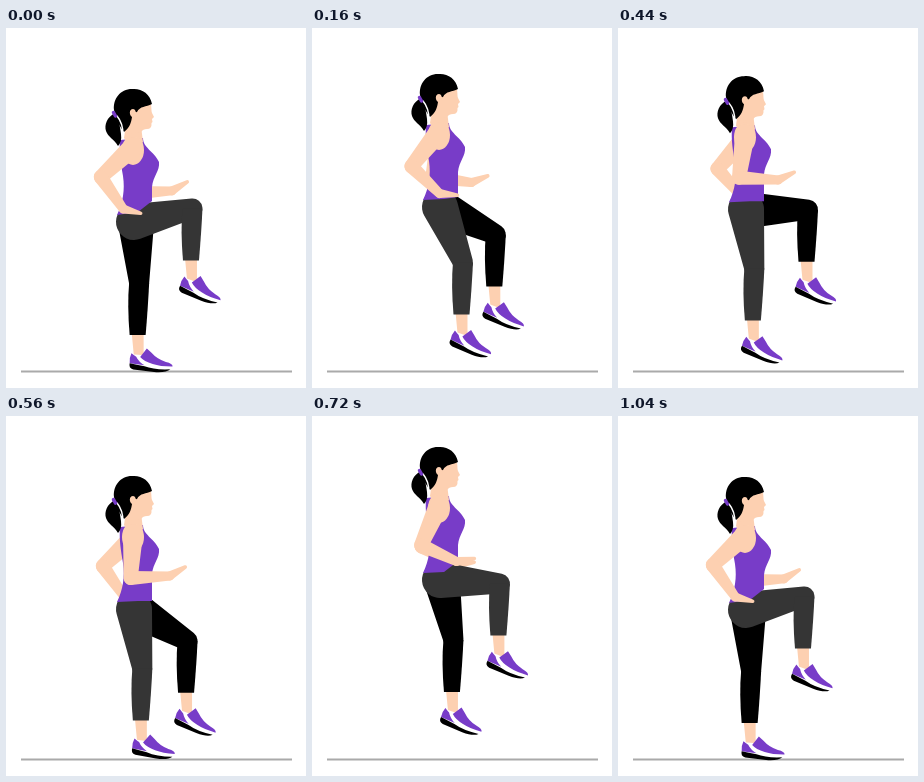
These frames come from a looping animation (300 by 360 pixels, 1080 ms). An HTML page with a canvas:

```html
<!DOCTYPE html>
<html>
<head>
<meta charset="utf-8">
<style>
  html, body { margin: 0; width: 100%; height: 100%; overflow: hidden; background: #fff; }
  canvas { display: block; width: 300px; height: 360px; }
</style>
</head>
<body>
<canvas id="stage" width="300" height="360"></canvas>
<script>
const ctx = document.getElementById('stage').getContext('2d');
const LOOP = 1080, STEP = 40;
const HOP = 30, THIGH = 60, SHIN = 52, UPPER_ARM = 44, FOREARM = 39;
const SKIN = '#fdd0b1', PURPLE = '#783cc8', GRAY = '#353535', BLACK = '#000';

const rad = deg => deg * Math.PI / 180;
const clamp = (v, lo, hi) => Math.min(hi, Math.max(lo, v));

// Smooth 0 to 1 between two times.
const ramp = (t, from, to) => (1 - Math.cos(Math.PI * clamp((t - from) / (to - from), 0, 1))) / 2;

function fill(color, d) {
  ctx.fillStyle = color;
  ctx.fill(new Path2D(d));
}

function line(color, width, d) {
  ctx.strokeStyle = color;
  ctx.lineWidth = width;
  ctx.lineCap = 'round';
  ctx.stroke(new Path2D(d));
}

// Tapered limb: two circles joined by their outer tangents.
function limb(color, x1, y1, r1, x2, y2, r2) {
  const dir = Math.atan2(y2 - y1, x2 - x1);
  const open = Math.acos((r1 - r2) / Math.hypot(x2 - x1, y2 - y1));
  ctx.fillStyle = color;
  ctx.beginPath();
  ctx.arc(x1, y1, r1, dir + open, dir - open + 2 * Math.PI);
  ctx.arc(x2, y2, r2, dir - open, dir + open);
  ctx.closePath();
  ctx.fill();
}

// swing: 0 = elbow back with hand at the hip, 1 = forearm forward.
function arm(x, y, swing) {
  const upper = rad(47 - 44 * swing), fore = rad(55 - 58 * swing), hand = rad(14 - 44 * swing);
  const ex = x - UPPER_ARM * Math.sin(upper), ey = y + UPPER_ARM * Math.cos(upper);
  const wx = ex + FOREARM * Math.cos(fore), wy = ey + FOREARM * Math.sin(fore);
  limb(SKIN, x, y, 10, ex, ey, 7);
  limb(SKIN, ex, ey, 7, wx, wy, 4.5);
  limb(SKIN, wx, wy, 4.5, wx + 18 * Math.cos(hand), wy + 18 * Math.sin(hand), 1.8);
}

function shoe(x, y) {
  ctx.save();
  ctx.translate(x, y);
  ctx.rotate(rad(clamp((326 - y) * 1.4, 2, 20)));
  fill('#fff', 'M-8 4L-9 15L32 16Q35 14 33 11L2 4Z');
  fill(PURPLE, 'M1 6L7 -3L12 1Q18 7 27 9Q34 10 34 13Q22 14 14 12Q5 10 1 6Z');
  fill(PURPLE, 'M-8 3Q-5 5 -3 6Q0 11 6 14L-9 13Q-10 8 -8 3Z');
  fill(BLACK, 'M-9 13Q-2 14 6 15Q16 18 32 16Q28 20 16 20L-5 19Q-10 18 -9 13Z');
  ctx.restore();
}

// The shin hangs straight down; only the thigh turns.
function leg(color, x, y, angle) {
  const kx = x + THIGH * Math.sin(rad(angle)), ky = y + THIGH * Math.cos(rad(angle));
  const hx = kx - 1.5, hy = ky + SHIN;
  limb(SKIN, hx, hy - 3, 6, hx + 1, hy + 18, 5);
  shoe(hx + 2, hy + 16);
  limb(color, x, y, 18, kx, ky, 10);
  fill(color, `M${kx - 10} ${ky}Q${kx - 12} ${ky + 22} ${hx - 8} ${hy}L${hx + 8} ${hy}` +
    `Q${kx + 9} ${ky + 22} ${kx + 10} ${ky}Z`);
}

function torso(hem) {
  fill(PURPLE, 'M114 112L137 110C137 120 148 123 153 134C154 143 147 148 146 159' +
    `L146 ${hem}L132 ${Math.min(186, hem + 11)}L111 187C117 174 119 162 117 148C115 136 113 125 114 112Z`);
  fill(SKIN, 'M120 96L118 110L127 123L137 114L135 98Z');
  ctx.beginPath();
  ctx.ellipse(127, 122, 11, 15, 0, 0, 2 * Math.PI);
  ctx.fill();
}

function head() {
  fill(SKIN, 'M122 72L144 73C146 78 145 82 146 85L148 89L146 91L146.5 94L145.5 95' +
    'Q146 101 141 101Q137 101 135 104L120 106Z');
  fill(BLACK, 'M109 85C101 89 98 97 100 103C102 109 108 111 112 118Q116 114 115 106C114 97 112 90 111 87Z');
  fill(BLACK, 'M146 76C144 65 135 60 126 61C114 61 107 71 108 82C110 92 114 99 118 104' +
    'C124 99 125 95 126 89C123 87 123 81 127 81C130 81 129 85 131 84C134 78 140 79 146 76Z');
  line('#fff', 1.5, 'M111 88Q117 95 117 107');
  line(PURPLE, 3.5, 'M107.5 84.5L109.5 88');
}

function draw(t) {
  const rise = -HOP * (ramp(t, 0, 320) - ramp(t, 320, 540) + ramp(t, 540, 720) - ramp(t, 720, 1040));
  const swing = ramp(t, 0, 560) - ramp(t, 560, 890);
  const nearLift = 1 - ramp(t, 0, 215) + ramp(t, 560, 780);
  const farLift = ramp(t, 0, 265) - ramp(t, 380, 800);

  ctx.fillStyle = '#fff';
  ctx.fillRect(0, 0, 300, 360);
  ctx.fillStyle = '#aaa';
  ctx.fillRect(15, 342.5, 271, 2);

  arm(129, 121 + rise, 1 - swing);
  leg(BLACK, 130, 195 + rise, 3 + 92 * farLift);
  leg(GRAY, 128, 194 + rise, 8 + 95 * nearLift);

  ctx.save();
  ctx.translate(0, rise);
  torso(186 - 13 * nearLift);
  head();
  ctx.restore();
  arm(127, 119 + rise, swing);
}

function tick() {
  const t = performance.now() % LOOP;
  draw(Math.floor(t / STEP) * STEP);
  requestAnimationFrame(tick);
}
tick();
</script>
</body>
</html>
```
